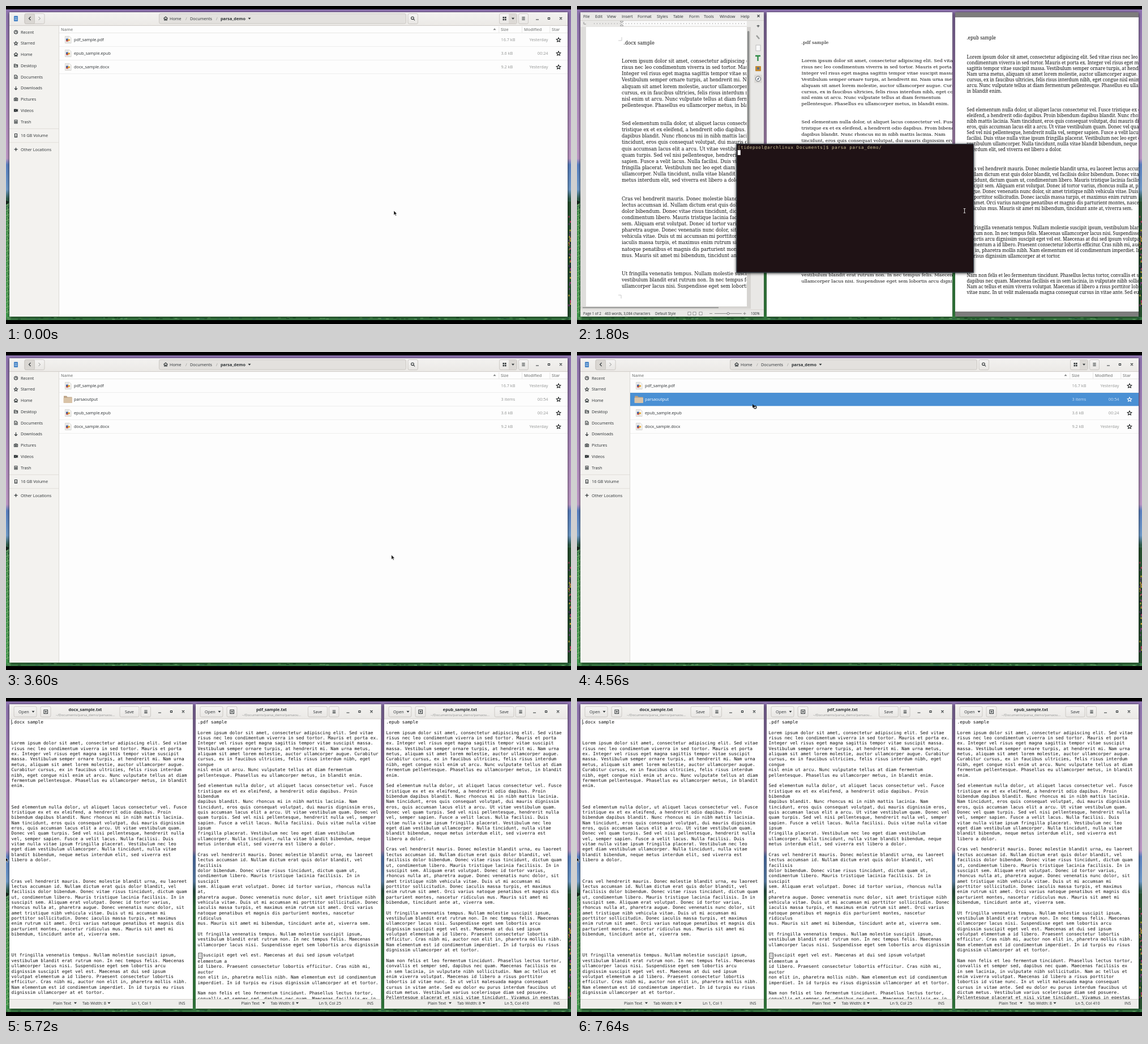
Recreate the animation shown at these times as an HTML page. Size 998 by 561 pixels, loop 7680 ms.

```html
<!DOCTYPE html>
<html lang="en">
<head>
<meta charset="utf-8">
<title>Documents to text</title>
<style>
html, body { margin: 0; width: 100%; height: 100%; overflow: hidden; background: #000; }
svg { display: block; width: 100vw; height: 100vh; }
text { white-space: pre; font: 7.3px "Open Sans", "Noto Sans", sans-serif; fill: #2b3033; }
text.bold { font-weight: 700; }
text.dim { fill: #939594; }
text.head { font-weight: 600; fill: #858786; }
text.light { fill: #fff; }
text.pale { fill: #c9def3; }
text.small { font-size: 6px; fill: #8f9190; }
text.status { font-size: 6.2px; }
text.serif { font: 8.3px "DejaVu Serif", serif; fill: #111; }
text.pdf { font: 8.13px "DejaVu Serif", serif; fill: #111; }
text.epub { font: 8.15px "Noto Serif", serif; fill: #111; }
text.mono { font: 7.8px "DejaVu Sans Mono", monospace; fill: #111; }
text.term { font: 7.5px "DejaVu Sans Mono", monospace; letter-spacing: .675px; fill: #d0c596; }
.line { fill: none; stroke: #2e3436; stroke-width: 1.1; }
.win { filter: drop-shadow(0 0 .6px rgba(0, 0, 0, .6)) drop-shadow(0 1px 2.5px rgba(0, 0, 0, .8)); }
</style>
</head>
<body>
<svg id="stage" viewBox="0 0 998 561" preserveAspectRatio="none"></svg>
<script>
// "|" marks a line end on the printed page, "/" one in the e-book view.
const paragraphs = [
  'Lorem ipsum dolor sit amet, consectetur adipiscing elit. Sed vitae |risus nec leo /condimentum viverra in sed tortor. Mauris et porta ex. |Integer vel risus eget magna /sagittis tempor vitae suscipit massa. |Vestibulum semper ornare turpis, at hendrerit mi. /Nam urna metus, |aliquam sit amet lorem molestie, auctor ullamcorper augue. Curabitur |/cursus, ex in faucibus ultricies, felis risus interdum nibh, eget congue |nisl enim ut /arcu. Nunc vulputate tellus at diam fermentum |pellentesque. Phasellus eu ullamcorper metus, /in blandit enim.',
  'Sed elementum nulla dolor, ut aliquet lacus consectetur vel. Fusce |tristique ex et ex /eleifend, a hendrerit odio dapibus. Proin bibendum |dapibus blandit. Nunc rhoncus mi in /nibh mattis lacinia. Nam |tincidunt, eros quis consequat volutpat, dui mauris dignissim /eros, |quis accumsan lacus elit a arcu. Ut vitae vestibulum quam. Donec vel |quam turpis. /Sed vel nisi pellentesque, hendrerit nulla vel, semper |sapien. Fusce a velit lacus. Nulla /facilisi. Duis vitae nulla vitae ipsum |fringilla placerat. Vestibulum nec leo eget diam /vestibulum |ullamcorper. Nulla tincidunt, nulla vitae blandit bibendum, neque |metus /interdum elit, sed viverra est libero a dolor.',
  'Cras vel hendrerit mauris. Donec molestie blandit urna, eu laoreet |lectus accumsan id. /Nullam dictum erat quis dolor blandit, vel facilisis |dolor bibendum. Donec vitae risus /tincidunt, dictum quam ut, |condimentum libero. Mauris tristique lacinia facilisis. In in /suscipit |sem. Aliquam erat volutpat. Donec id tortor varius, rhoncus nulla at, |pharetra /augue. Donec venenatis nunc dolor, sit amet tristique nibh |vehicula vitae. Duis ut mi accumsan /mi porttitor sollicitudin. Donec |iaculis massa turpis, et maximus enim rutrum /sit amet. Orci varius |natoque penatibus et magnis dis parturient montes, nascetur /ridiculus |mus. Mauris sit amet mi bibendum, tincidunt ante at, viverra sem.',
  'Ut fringilla venenatis tempus. Nullam molestie suscipit ipsum, |vestibulum blandit erat /rutrum non. In nec tempus felis. Maecenas |ullamcorper lacus nisi. Suspendisse eget sem /lobortis arcu dignissim |suscipit eget vel est. Maecenas at dui sed ipsum volutpat /elementum a |id libero. Praesent consectetur lobortis efficitur. Cras nibh mi, auctor |non /elit in, pharetra mollis nibh. Nam elementum est id condimentum |imperdiet. In id turpis /eu risus dignissim ullamcorper at et tortor.',
  'Nam non felis et leo fermentum tincidunt. Phasellus lectus tortor, |convallis et semper sed, /dapibus nec quam. Maecenas facilisis ex in |sem lacinia, in vulputate nibh sollicitudin. /Nam ac tellus et enim viverra volutpat. Maecenas id libero a risus porttitor lobortis id /vitae nunc. In ut velit malesuada magna consequat cursus in vitae ante. Sed eu /dolor eu purus interdum faucibus ut dictum metus. Vestibulum varius scelerisque diam sed posuere. Pellentesque placerat et nisi vitae tincidunt. Vivamus in egestas'
];
const plain = s => s.replace(/[|/]/g, '');
const pageLines = s => s.replace(/\//g, '').split('|').map(l => l.trimEnd());
const bookLines = s => s.replace(/\|/g, '').split('/').map(l => l.trimEnd());

function wrap(s, limit) {
  const indent = s.match(/^ */)[0], out = [];
  let line = indent;
  for (const word of s.trim().split(' ')) {
    const next = line.trim() ? line + ' ' + word : line + word;
    if (next.length > limit) { out.push(line); line = word; } else line = next;
  }
  return [...out, line];
}

const text = (x, y, s, cls = '', anchor = 'start') =>
  `<text x="${x}" y="${y}" class="${cls}" text-anchor="${anchor}">${s}</text>`;
const rect = (x, y, w, h, fill, more = '') =>
  `<rect x="${x}" y="${y}" width="${w}" height="${h}" fill="${fill}" ${more}/>`;
const path = (d, more = 'class="line"') => `<path d="${d}" ${more}/>`;
const at = (x, y, s) => `<g transform="translate(${x} ${y})">${s}</g>`;
const group = (id, s, more = '') => `<g id="${id}" ${more}>${s}</g>`;
const lines = (x, y, pitch, list, cls) =>
  list.map((l, i) => l ? text(x, +(y + i * pitch).toFixed(2), l, cls) : '').join('');
const solid = c => `fill="${c}"`;
const arrowDown = (x, y, c = '#2e3436') => path(`M${x - 2.5} ${y - 1.2}h5l-2.5 3z`, solid(c));
const arrowUp = (x, y) => path(`M${x - 2.5} ${y + 1.2}h5l-2.5-3z`, solid('#7c7e7d'));
const button = (x, y, w, h, fill = 'url(#button)') => rect(x, y, w, h, fill, 'rx="2.5" stroke="#c4c0bb" stroke-width=".8"');
const menuIcon = (x, y) => path(`M${x - 2.7} ${y - 2.2}h5.4m-5.4 2.2h5.4m-5.4 2.2h5.4`);
const windowButtons = (x, y) =>
  path(`M${x - 44} ${y + 2}h5M${x - 22.5} ${y - 1.5}h3v3h-3zM${x - 2} ${y - 2}l4 4m0-4l-4 4`);

function wallpaper() {
  let seed = 7, s = rect(0, 6, 998, 548, 'url(#sky)');
  const rnd = () => (seed = seed * 16807 % 2147483647) / 2147483647;
  for (let y = 352; y < 548; y += 9)
    s += path(`M0 ${y}l6-3m-4-4l2 9`, 'stroke="#8cc47f" stroke-width="1"');
  s += rect(992, 345, 6, 209, '#27502f') + rect(0, 549, 998, 5, '#3a7d45');
  for (let i = 0; i < 55; i++)
    s += rect((993 + rnd() * 4).toFixed(1), (370 + rnd() * 170).toFixed(1), 2, 3, ['#b33a62', '#c9a83a', '#1c2b33', '#6a3d7c'][i % 4]);
  for (let i = 0; i < 110; i++)
    s += rect((rnd() * 996).toFixed(1), (549 + rnd() * 3).toFixed(1), 5, 1.5, ['#23572f', '#63a866', '#2f6f50'][i % 3]);
  return s + path('M0 343l5 2-2 4-3 1z', solid('#16241c'));
}

const placeIcons = [
  'M3 0a3 3 0 1 0-6 0a3 3 0 1 0 6 0M0-2v2h1.7',
  'M0-3l.9 2 2.2.3-1.6 1.5.4 2.2L0 2l-1.9 1 .4-2.2L-3.1-.7l2.2-.3z',
  'M-3.5 0L0-3 3.5 0M-2.3 0v3h1.6V1h1.4v2h1.6V0',
  'M-3-2.5h2.5l1 1H3v4h-6zM-3 0h6',
  'M-2.5-3h3l2 2v4h-5zM-1 0h2m-2 1.5h2',
  'M0-3v6m-2.5-2.5L0 3 2.5.5',
  'M-3-1.8h1.5l1-1h1l1 1H3v4.3h-6zM1.2.3a1.2 1.2 0 1 0-2.4 0a1.2 1.2 0 1 0 2.4 0',
  'M-3-2H1v4h-4zM1 0l2-1.6v3.2zM-2-1H0v2h-2z',
  'M-3-2.8h6M-2.4-2v5h4.8v-5M-.8-1v3m1.6-3v3',
  'M-2-3h4v6h-4zM-1 1h2',
  'M-3 0h6M0-3v6'
];
const places = ['Recent', 'Starred', 'Home', 'Desktop', 'Documents', 'Downloads', 'Pictures', 'Videos', 'Trash', '16 GB Volume', 'Other Locations'];
const star = (y, c) => path(`M976 ${y - 3.6}l1.1 2.4 2.6.3-1.9 1.8.5 2.6-2.3-1.3-2.3 1.3.5-2.6-1.9-1.8 2.6-.3z`, `fill="none" stroke="${c}" stroke-width="1.1"`);

const sheet = y => path(`M104.5 ${y - 6}h7.5l3 3v9h-10.5z`, 'fill="#f7f7f5" stroke="#c3c2bd" stroke-width=".7"');
const fileIcons = {
  doc: y => sheet(y) + rect(106, y - 2, 4, 4, '#3c5fa0') + rect(109, y - 1, 4, 3, '#e6a32e') + rect(106, y + 1, 4, 2, '#c4453a') + path(`M106 ${y - 4}h5m-5 8.2h7`, 'stroke="#bbb" stroke-width=".6"'),
  txt: y => sheet(y) + path(`M106 ${y - 3}h5m-5 2h7m-7 2h7m-7 2h7`, 'stroke="#d2d2ce" stroke-width=".6"'),
  dir: y => path(`M102 ${y - 6}h5l1.5 2h8v10h-14.5z`, solid('#b99e80')) + rect(101.5, y - 3, 15.5, 9.5, '#d9c3a7', 'rx="1"')
};

function fileRow(i, [kind, name, size, when], selected) {
  const y = 59.5 + i * 24, soft = selected ? 'pale' : 'dim';
  return (selected ? rect(94, y - 11.5, 898, 23.3, '#4a90d4') : '') +
    rect(94, y + 11.6, 898, .7, selected ? '#d5e4f3' : '#e9e9e7') +
    fileIcons[kind](y) + text(120, y + 2.6, name, selected ? 'light' : '') +
    text(874.5, y + 2.6, size, soft) + text(957.5, y + 2.6, when, soft, 'end') + star(y, selected ? '#fff' : '#1d2021');
}

function fileManager() {
  let s = rect(6, 11, 986, 537, '#fdfdfd') + rect(6, 11, 986, 23.5, 'url(#header)') + rect(6, 34, 986, .8, '#c9c5c0') +
    rect(6, 35, 87, 513, '#f3f2ef') + rect(93, 35, .8, 513, '#d3d0cb');
  s += rect(14, 17.5, 7, 9.5, '#3f7fc4', 'rx="1"') + path('M15 21h5m-5 3h5', 'stroke="#dce9f6" stroke-width="1"');
  s += button(33, 13.5, 35, 18) + button(33, 13.5, 17.5, 18, '#d9d6d2') + path('M43.5 19l-3 3 3 3') + path('M57.5 19l3 3-3 3', 'fill="none" stroke="#8d908f"');
  s += button(270.5, 13.5, 436, 17.5, '#e3e1de') + button(710, 13.5, 17.5, 18) + button(871.5, 13.5, 31, 18) + rect(888, 14, 14, 17, '#dcd9d5') + button(905.5, 13.5, 17, 18);
  s += '<circle cx="718" cy="21.3" r="2.3" class="line"/>' + path('M719.8 23l2.2 2.4');
  s += [[877.5, 19], [881, 19], [877.5, 22.7], [881, 22.7]].map(([x, y]) => rect(x, y, 2.6, 2.6, '#2e3436')).join('') + arrowDown(895.5, 22) + menuIcon(914, 22) + windowButtons(980, 22);
  s += at(282, 22, path(placeIcons[2])) + text(289, 24.7, 'Home') + text(317, 24.7, '/', 'dim') + text(325, 24.7, 'Documents') + text(371, 24.7, '/', 'dim');
  places.forEach((name, i) => {
    const y = i < 9 ? 46 + i * 19.75 : 228.5 + (i - 9) * 24.4;
    s += at(17.5, y, path(placeIcons[i])) + text(26, y + 2.6, name);
  });
  s += rect(6, 216, 87, .7, '#dad7d2') + rect(6, 240.5, 87, .7, '#dad7d2');
  s += rect(94, 47.3, 898, .7, '#dfdedb') + [870.5, 911, 960.5].map(x => rect(x, 36, .7, 11, '#dfdedb')).join('');
  return s + text(97, 43.7, 'Name', 'head') + text(874, 43.7, 'Size', 'head') + text(915, 43.7, 'Modified', 'head') + text(964, 43.7, 'Star', 'head');
}

const pdfFile = ['doc', 'pdf_sample.pdf', '16.7 kB', 'Yesterday'];
const epubFile = ['doc', 'epub_sample.epub', '3.6 kB', '00:24'];
const docxFile = ['doc', 'docx_sample.docx', '9.2 kB', 'Yesterday'];
const outDir = ['dir', 'parsaoutput', '3 items', '00:54'];
const outFiles = ['docx', 'epub', 'pdf'].map(n => ['txt', n + '_sample.txt', '3.1 kB', '00:54']);
const rows = (files, selected = () => false) => files.map((f, i) => fileRow(i, f, selected(i))).join('');
const demoPath = text(379, 24.7, 'parsa_demo', 'bold') + arrowDown(430, 22) + arrowUp(863, 41);
const outPath = text(379, 24.7, 'parsa_demo') + text(429, 24.7, '/', 'dim') + text(437, 24.7, 'parsaoutput', 'bold') + arrowDown(487, 22) + arrowDown(863, 41, '#7c7e7d');
const withDir = [pdfFile, outDir, epubFile, docxFile];

function writerWindow() {
  const menu = { File: 11, Edit: 32, View: 53, Insert: 79, Format: 107, Styles: 141, Table: 170, Form: 198, Tools: 224, Window: 252, Help: 289 };
  let s = rect(6, 11, 324, 537, '#e9e8e6') + rect(6, 25, 324, .7, '#cfccc8') + rect(6, 37, 294, 493, '#dedddb') + rect(16, 37, 284, 493, '#fff');
  for (const name in menu) s += text(menu[name], 20.6, name);
  s += path('M318.5 15.7l4 4m0-4l-4 4') + rect(79, 26.5, 221, 8.5, '#fafafa');
  for (let x = 30; x < 298; x += 5.1) s += rect(x.toFixed(1), 30, .7, 2, '#999');
  s += path('M12 28v4h4', 'fill="none" stroke="#777" stroke-width=".8"') + path('M76 27h6l-3 3zM76 35h6l-3-3z', 'fill="#eee" stroke="#777" stroke-width=".7"');
  s += path('M73 61h6v-6M73 510h5v6', 'fill="none" stroke="#bbb" stroke-width=".8"') + rect(300, 37, 7, 493, '#d6d4d1') + rect(301, 44, 3.5, 300, '#8e908f', 'rx="1.7"') + rect(6, 530, 301, 4, '#d6d4d1') + rect(10, 531.2, 240, 2, '#9a9b99');
  let body = text(82, 68, '.docx sample', 'serif');
  [100, 210, 342.5, 475].forEach((y, i) => body += lines(79, y, 11.13, pageLines(paragraphs[i]).slice(0, i < 3 ? 20 : 3), 'serif'));
  s += `<g clip-path="url(#page)">${body}</g>`;
  s += path('M317.5 35h5m-2.5-1.5v4') + path('M317 52l5 6', 'stroke="#9a9c9a" stroke-width="2.5"') + rect(316, 69, 8, 10, '#fafafa', 'stroke="#aaa" stroke-width=".7"') +
    path('M315 88h9m-4.5 0v9', 'fill="none" stroke="#2d8a45" stroke-width="2.3"') + rect(315, 106, 10, 9, '#c18a35', 'rx="1"') + rect(318, 108, 4, 4, '#5a6f8c') +
    rect(313, 121, 14, 15, '#dcdad7', 'rx="2"') + '<circle cx="320" cy="128.5" r="4.5" fill="#f5f5f5" stroke="#5d6366"/>' + path('M322 126l-3 1.5-1 3.5 3-1.5z', solid('#68748a'));
  s += rect(6, 535.5, 324, .7, '#cfccc8') + text(11, 545, 'Page 1 of 2', 'status') + text(49, 545, '463 words, 3,084 characters', 'status') + text(138, 545, 'Default Style', 'status') + text(307, 545, '100%', 'status');
  s += [196, 205, 216].map(x => rect(x, 540, 5, 5, '#fff', 'stroke="#666" stroke-width=".7"')).join('') + path('M234 542.5h5m4 0h48m2.5 0h5m-2.5-2.5v5', 'stroke="#777" stroke-width=".8"');
  return s + '<circle cx="267" cy="542.5" r="2" fill="#eee" stroke="#666" stroke-width=".8"/>';
}

function pdfWindow() {
  let s = rect(335, 11, 328, 537, '#fff') + text(396.5, 67.3, '.pdf sample', 'pdf');
  [99.3, 207, 336.2, 466.2].forEach((y, i) => s += lines(396.5, y, 10.86, pageLines(paragraphs[i]).slice(0, i < 3 ? 20 : 3), 'pdf'));
  return `<g clip-path="url(#pdfClip)">${s}</g>`;
}

function bookWindow() {
  let s = rect(668, 11, 324, 537, '#fff') + rect(668, 11, 324, 9, '#7d7c7c') + rect(668, 539, 324, 9, '#7d7c7c') + text(688.5, 58.8, '.epub sample', 'epub');
  [92.8, 186.3, 290, 394, 477.8].forEach((y, i) => s += lines(688.5, y, 9.98, bookLines(paragraphs[i]).slice(0, i < 4 ? 9 : 4), 'epub'));
  return `<g clip-path="url(#bookClip)">${s}</g>`;
}

function editor(left, right, name, position, content, extra = '') {
  const w = right - left, clip = name + 'Text';
  let s = rect(left, 11, w, 537, '#fff') + rect(left, 11, w, 25.5, 'url(#header)') + rect(left, 36.5, w, .8, '#c9c5c0');
  s += button(left + 8, 15, 40, 18.5) + text(left + 16, 26.7, 'Open') + arrowDown(left + 42, 24) + button(left + 55, 15, 18, 18.5);
  s += path(`M${left + 61} 21h6.5v6.5h-6.5zm1.6 3.2h3.4m-1.7-1.7v3.4`) + button(right - 129, 15, 34, 18.5) + text(right - 112, 26.7, 'Save', '', 'middle');
  s += button(right - 92, 15, 17.5, 18.5) + menuIcon(right - 83, 24.2) + windowButtons(right - 17, 24);
  s += text(left + 134, 22.7, name + '_sample.txt', 'bold', 'middle') + text(left + 134, 31.6, '~/Documents/parsa_demo/parsaou...', 'small', 'middle');
  s += `<clipPath id="${clip}"><rect x="${left}" y="37" width="${w}" height="494"/></clipPath><g clip-path="url(#${clip})">` + content + extra + '</g>';
  s += rect(left, 531, w, 17, '#eeedea') + rect(left, 531, w, .8, '#d0cdc8');
  s += text(right - 247, 540.8, 'Plain Text') + arrowDown(right - 207.5, 538) + text(right - 195, 540.8, 'Tab Width: 8') + arrowDown(right - 148, 538);
  return s + text(right - 108 - (position.length - 11) * 1.8, 540.8, position) + text(right - 25, 540.8, 'INS');
}

const rowHeight = 9.352;
const monoRows = (x, y, list) => lines(x, y, rowHeight, list, 'mono');

function plainText(x, title, gap) {
  const blank = Array(gap).fill('');
  return monoRows(x, 45, [title, ...paragraphs.flatMap(p => [...blank, ...wrap(plain(p), 66)])].slice(0, 53));
}

// The boxed page-break glyph makes its row a little taller than the others.
function pdfText(x) {
  const first = ['.pdf sample'], second = [];
  let page = first;
  paragraphs.forEach((p, i) => {
    page.push('');
    pageLines(p).forEach((line, n) => {
      const pageBreak = i === 3 && n === 3;
      const wrapped = wrap((pageBreak ? '  ' : '') + line, 68);
      if (pageBreak) {
        first.push('', wrapped.shift());
        page = second;
      }
      page.push(...wrapped);
    });
  });
  return monoRows(x, 45, first) + monoRows(x, 46.3 + first.length * rowHeight, second.slice(0, 8));
}

const prompt = '[tidepool@archlinux Documents]$ ', command = 'parsa parsa_demo/', cell = 5.19;
const terminal = rect(282, 243.5, 418.5, 226.5, '#1f1215', 'stroke="#3d4a55" stroke-width="1"') +
  '<text id="firstLine" class="term" x="284" y="252.2"></text><text id="secondLine" class="term" x="284" y="261.4"></text>' +
  '<rect id="block" width="5" height="8.8" fill="#fff"/>';

const gradient = (id, ...stops) => `<linearGradient id="${id}" x2="0" y2="1">` +
  stops.map(([o, c]) => `<stop offset="${o}" stop-color="${c}"/>`).join('') + '</linearGradient>';
const clipRect = (id, x, w) => `<clipPath id="${id}"><rect x="${x}" y="11" width="${w}" height="537"/></clipPath>`;
const glyphBox = rect(340, 450, 6.5, 9.4, 'none', 'stroke="#222" stroke-width=".8"') + path('M341.7 452.5h1m1.3 0h1m-3.3 2h1m1.3 0h1m-3.3 2h1m1.3 0h1', 'stroke="#222" stroke-width=".8"');

stage.innerHTML = '<defs>' +
  gradient('sky', [0, '#8f74b0'], [.3, '#b08cc0'], [.48, '#c09ac8'], [.5, '#5b82c4'], [.58, '#6f9ccc'], [.61, '#2f5c4a'], [.66, '#3c8b48'], [1, '#3f9a4c']) +
  gradient('header', [0, '#f3f2f0'], [1, '#ebe9e6']) + gradient('button', [0, '#f5f4f3'], [1, '#e8e6e3']) +
  clipRect('page', 16, 283.5) + clipRect('pdfClip', 335, 328) + clipRect('bookClip', 668, 324) + '</defs>' +
  rect(0, 0, 998, 561, '#000') + wallpaper() +
  group('files', fileManager(), 'class="win"') +
  group('before', demoPath + rows([pdfFile, epubFile, docxFile])) +
  group('after', demoPath + rows(withDir)) +
  group('picked', demoPath + rows(withDir, i => i === 1)) +
  group('opened', outPath + rows(outFiles)) +
  group('allPicked', outPath + rows(outFiles, () => true)) +
  group('documents', [writerWindow(), pdfWindow(), bookWindow()].map(w => `<g class="win">${w}</g>`).join('')) +
  group('terminal', terminal, 'class="win"') +
  group('editors', [
    editor(6, 330, 'docx', 'Ln 1, Col 1', plainText(9.6, '.docx sample', 3), rect(9.5, 38, .8, 9, '#111')),
    editor(335, 662.5, 'pdf', 'Ln 9, Col 25', pdfText(338.6), glyphBox),
    editor(668, 992, 'epub', 'Ln 5, Col 410', plainText(671.6, '.epub sample', 1))
  ].map(w => `<g class="win">${w}</g>`).join('')) +
  rect(0, 0, 998, 6, '#000') + rect(0, 554, 998, 7, '#000') +
  group('arrow', path('M0 0v8l1.9-1.7 1.3 2.9 1.4-.6-1.3-2.8h2.5z', 'fill="#111" stroke="#fff" stroke-width=".6"')) +
  group('busy', '<circle cx="4.5" cy="5.5" r="2.4" fill="#ddd" stroke="#222" stroke-width="1.2"/>' + path('M0 0v6l5-1.5z', solid('#111'))) +
  group('beam', path('M682.7 357.5h3.6m-1.8 0v7.5m-1.8 0h3.6', 'fill="none" stroke="#e8e8e8" stroke-width=".9"'));

const byId = id => document.getElementById(id);
const scenes = [
  [0, 'files before'], [400, 'documents'], [1160, 'documents terminal beam'],
  [3400, 'files after'], [4280, 'files picked'], [4760, 'files opened'],
  [4960, 'files allPicked'], [5440, 'editors']
];
const layers = [...new Set(scenes.flatMap(s => s[1].split(' ')))];
const pointer = [[0, 685, 361], [3560, 685, 361], [4200, 310, 92], [5200, 310, 92], [5600, -1, 281], [7680, -1, 281]];
const show = (id, on) => byId(id).setAttribute('display', on ? 'inline' : 'none');

function pointerAt(t) {
  const i = pointer.findIndex((p, n) => n && t <= p[0]);
  const [t0, x0, y0] = pointer[i - 1], [t1, x1, y1] = pointer[i];
  const k = (t - t0) / (t1 - t0), e = k * k * (3 - 2 * k);
  return `translate(${x0 + (x1 - x0) * e} ${y0 + (y1 - y0) * e})`;
}

function render(t) {
  const active = scenes.filter(s => s[0] <= t).pop()[1].split(' ');
  layers.forEach(id => show(id, active.includes(id)));
  const waiting = t >= 4400 && t < 4760, done = t >= 2000;
  show('busy', waiting);
  show('arrow', !waiting && !active.includes('beam'));
  ['arrow', 'busy'].forEach(id => byId(id).setAttribute('transform', pointerAt(t)));

  const typed = Math.round(command.length * Math.min(1, Math.max(0, (t - 1220) / 420)));
  byId('firstLine').textContent = prompt + command.slice(0, typed);
  byId('secondLine').textContent = done ? prompt : '';
  const entered = t >= 1800, column = done ? prompt.length : entered ? 0 : prompt.length + typed;
  byId('block').setAttribute('x', 283.8 + column * cell);
  byId('block').setAttribute('y', entered ? 254.2 : 245);
}

const start = performance.now();
function tick() {
  render(Math.floor((performance.now() - start) % 7680 / 40) * 40);
  requestAnimationFrame(tick);
}
tick();
</script>
</body>
</html>
```
